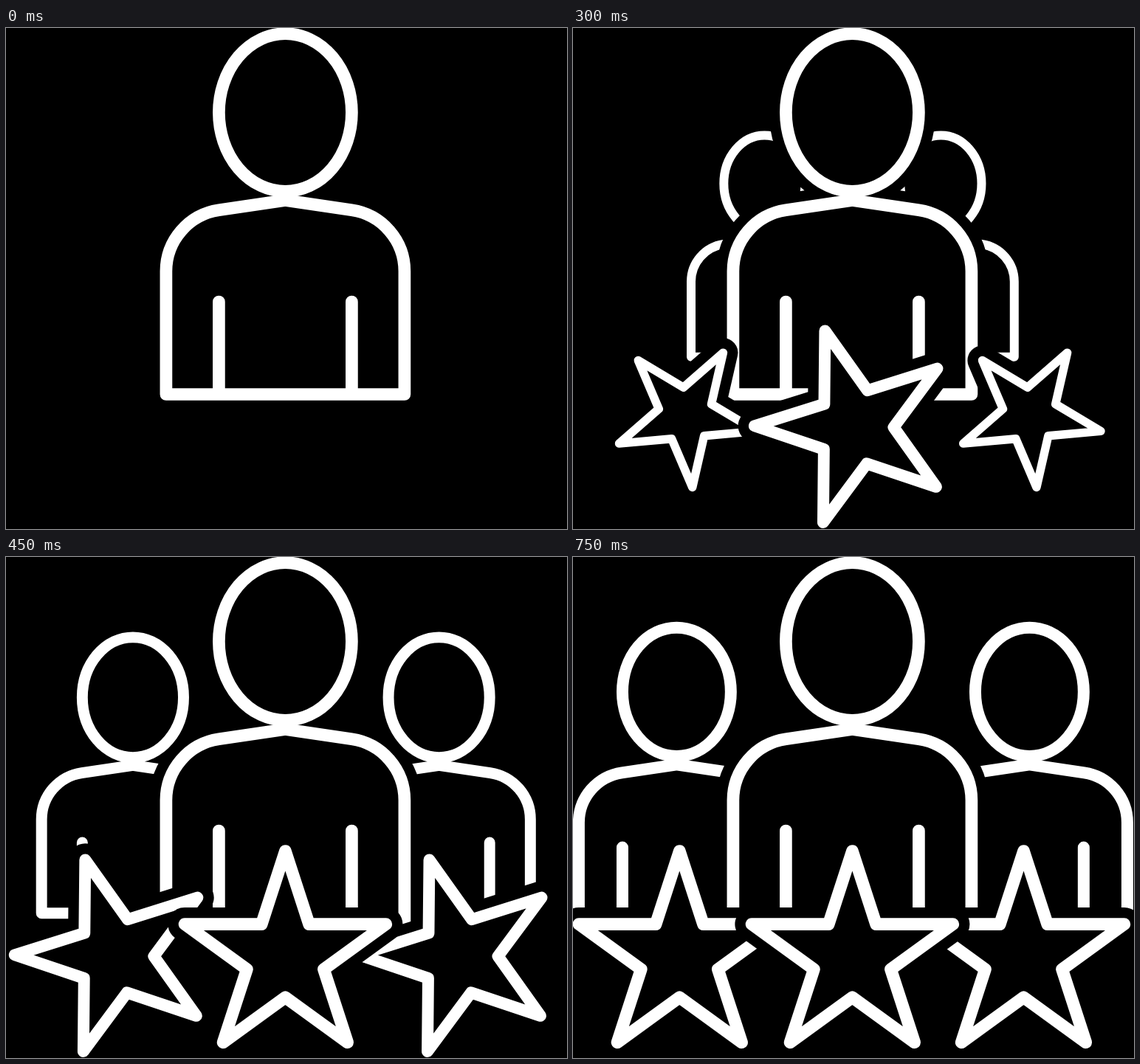
An HTML page with a canvas for the animation above (2.7 s loop, 760 by 679 pixels).

```html
<!DOCTYPE html>
<html lang="en">
<head>
<meta charset="utf-8">
<title>Team with stars</title>
<style>
  html, body { margin: 0; width: 100%; height: 100%; overflow: hidden; background: #000; }
  canvas { display: block; }
</style>
</head>
<body>
<canvas id="stage" width="760" height="679"></canvas>
<script>
const ctx = document.getElementById('stage').getContext('2d');
const LOOP = 2700, STEP = 30, GAP = 14.3, MID = 378.4;

// Both shapes are built around the centre of their bounding box.
// half: half the body width, drop: how far the body sits below the head.
function makePerson(half, drop) {
  const p = new Path2D();
  const neck = drop - 18.5, base = drop + 244.5;
  const corner = neck + half * 0.148;
  p.ellipse(0, -137.5, 90, 106.8, 0, 0, Math.PI * 2);
  p.moveTo(-half, base);
  p.arcTo(-half, corner, 0, neck, 83.8);
  p.lineTo(0, neck);
  p.arcTo(half, corner, half, base, 83.8);
  p.lineTo(half, base);
  p.closePath();
  for (const x of [-90, 90]) {
    p.moveTo(x, drop + 119);
    p.lineTo(x, base);
  }
  return p;
}

function makeStar() {
  const p = new Path2D(), outer = 143.4, inner = outer * 0.382;
  for (let i = 0; i < 10; i++) {
    const r = i % 2 ? inner : outer, a = (i / 5 - 0.5) * Math.PI;
    p.lineTo(r * Math.cos(a), 13.7 + r * Math.sin(a));
  }
  p.closePath();
  return p;
}

const leader = makePerson(161.5, 0), mate = makePerson(162.4, 1.8), star = makeStar();

// Cubic bezier easing (1/3, 0, 0, 1), solved by bisection.
function ease(x) {
  if (x <= 0) return 0;
  if (x >= 1) return 1;
  let lo = 0, hi = 1;
  for (let i = 0; i < 30; i++) {
    const u = (lo + hi) / 2;
    if (u * (1 - u) ** 2 + u ** 3 < x) lo = u; else hi = u;
  }
  return lo * lo * (3 - 2 * lo);
}

const progress = (t, start, length) => ease((t - start) / length);

// White outline over a black body with a gap of constant width around it.
function drawShape(path, x, y, scale, turn, width) {
  if (scale <= 0) return;
  ctx.save();
  ctx.translate(x, y);
  ctx.rotate(turn);
  ctx.scale(scale, scale);
  ctx.fillStyle = ctx.strokeStyle = '#000';
  ctx.lineWidth = width + 2 * GAP / scale;
  ctx.fill(path);
  ctx.stroke(path);
  ctx.strokeStyle = '#fff';
  ctx.lineWidth = width;
  ctx.stroke(path);
  ctx.restore();
}

function drawMate(shift, k) {
  drawShape(mate, MID + shift * k, 295, 0.816 * (0.5 + 0.5 * k), 0, 19.6);
}

function drawStar(x, k) {
  drawShape(star, x, 528.2, k, (k - 1) * Math.PI * 2, 16.7);
}

function draw(t) {
  ctx.fillStyle = '#000';
  ctx.fillRect(0, 0, 760, 679);
  ctx.lineCap = ctx.lineJoin = 'round';

  const walk = progress(t, 150, 600);
  drawMate(-238, walk);
  drawMate(240, walk);
  drawShape(leader, MID, 252, 1, 0, 16.7);

  const late = progress(t, 150, 450);
  drawStar(144.3, late);
  drawStar(610.5, late);
  drawStar(MID, progress(t, 0, 450));
}

const begin = performance.now();
function tick() {
  const t = (performance.now() - begin) % LOOP;
  draw(Math.floor(t / STEP) * STEP);
  requestAnimationFrame(tick);
}
tick();
</script>
</body>
</html>
```
